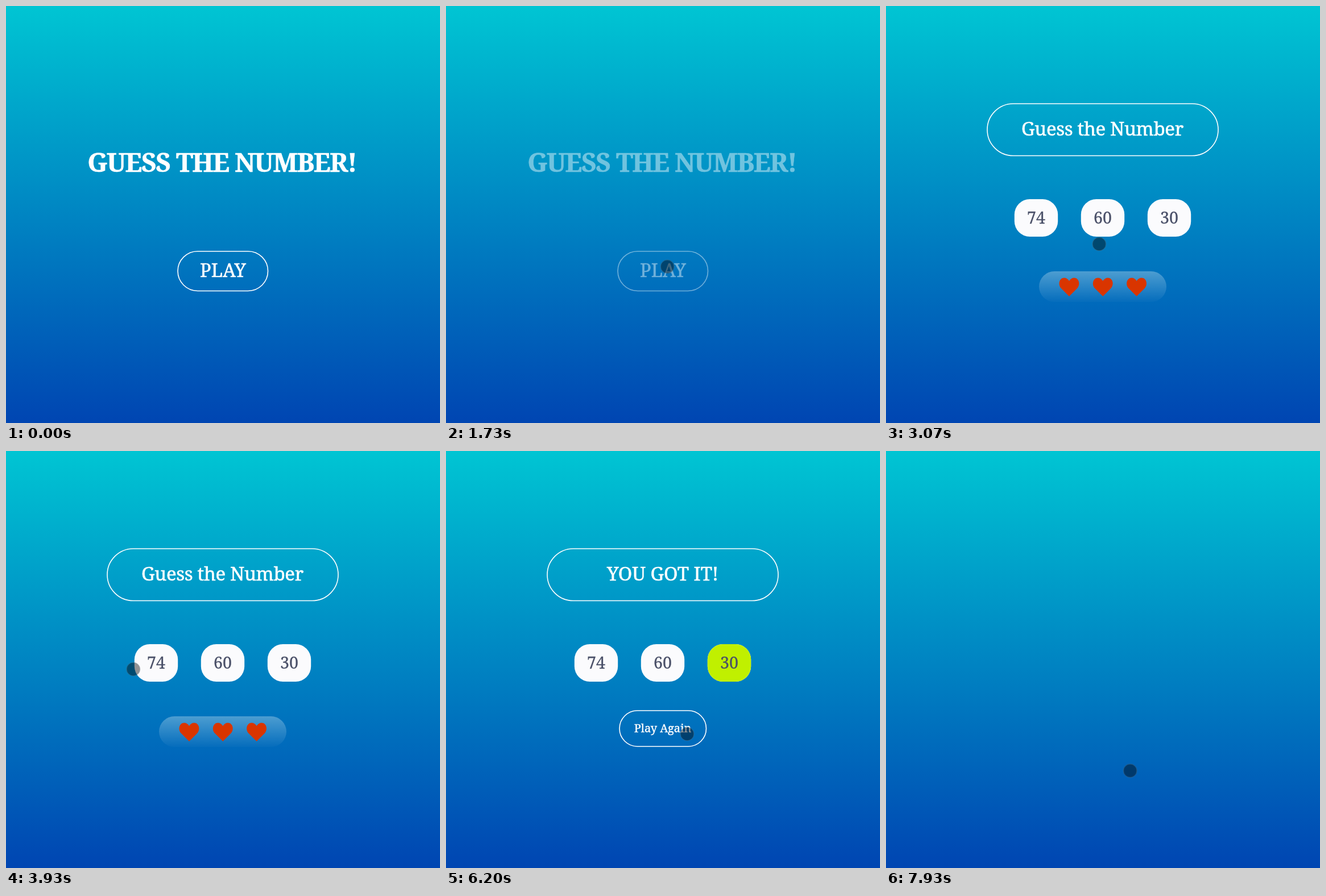
These frames come from a looping animation (763 by 734 pixels, 8000 ms). An HTML page:

```html
<!DOCTYPE html>
<html lang="en">
<head>
<meta charset="utf-8">
<title>Guess the Number</title>
<style>
  html, body { margin: 0; width: 100%; height: 100%; overflow: hidden; background: #0046b2; }
  svg { display: block; width: 100%; height: 100%; }
  text { font-family: "Noto Serif", "DejaVu Serif", serif; text-anchor: middle; fill: #fff; stroke: #fff; stroke-width: .6; }
  .outline { fill: none; stroke: #fff; stroke-width: 1.6; }
  .title { font-size: 46px; font-weight: 700; letter-spacing: -.036em; }
  .play { font-size: 32.5px; }
  .heading { font-size: 33px; }
  .again { font-size: 20px; stroke-width: .4; }
  .tile { fill: #fbfbfd; }
  .won { fill: #c0f000; }
  .number { font-size: 28.5px; fill: #4a5068; stroke: #4a5068; stroke-width: .3; }
  .heart { fill: #d93500; }
  #cursor { fill: rgba(0, 0, 0, .42); stroke: rgba(110, 130, 140, .4); }
</style>
</head>
<body>
<svg viewBox="0 0 763 734" preserveAspectRatio="none">
  <defs>
    <linearGradient id="sky" x2="0" y2="1">
      <stop stop-color="#00c5d3"/>
      <stop offset="1" stop-color="#0045b2"/>
    </linearGradient>
    <linearGradient id="glass" x2="0" y2="1">
      <stop stop-color="#fff" stop-opacity=".3"/>
      <stop offset="1" stop-color="#fff" stop-opacity=".02"/>
    </linearGradient>
    <path id="heart" d="M0 16.5L-14 2.5C-20.5-4.5-17-16-9-16C-5-16-2-14 0-10.5C2-14 5-16 9-16C17-16 20.5-4.5 14 2.5Z"/>
  </defs>
  <rect width="763" height="734" fill="url(#sky)"/>

  <g id="intro">
    <text class="title" x="379.5" y="292">GUESS THE NUMBER!</text>
    <rect class="outline" x="302" y="431.7" width="158.5" height="69.8" rx="35"/>
    <text class="play" x="381.5" y="477">PLAY</text>
  </g>

  <g id="game">
    <rect class="outline" x="178" y="172" width="406" height="91.5" rx="45.7"/>
    <text id="prompt" class="heading" x="380.5" y="228" letter-spacing="-.01em">Guess the Number</text>
    <text id="success" class="heading" x="381" y="228">YOU GOT IT!</text>
    <g id="tiles"></g>
    <g id="lives">
      <rect x="269" y="467" width="224" height="54" rx="27" fill="url(#glass)"/>
    </g>
    <g id="again">
      <rect class="outline" x="305" y="457" width="152.5" height="63" rx="31.5"/>
      <text class="again" x="381" y="495">Play Again</text>
    </g>
  </g>

  <circle id="cursor" r="11.8"/>
</svg>
<script>
const LOOP = 8000, FADE = 540;
const START = 1430, PICK = 4330, REPLAY = 6900;
const byId = id => document.getElementById(id);
const animate = (id, frames) => byId(id).animate(frames, { duration: LOOP, iterations: Infinity });

const tile = (x, attrs) => `<rect ${attrs} x="${x - 38.2}" y="340" width="76.4" height="66" rx="27"/>`;
[74, 60, 30].forEach((number, i) => {
  const x = 264 + 117 * i;
  byId('tiles').innerHTML += tile(x, 'class="tile"') + (number === 30 ? tile(x, 'class="won" id="won"') : '') +
    `<text class="number" x="${x}" y="383">${number}</text>`;
  byId('lives').innerHTML += `<use class="heart" href="#heart" x="${322 + 59.3 * i}" y="494.5"/>`;
});

// Flips the visibility at each given time
function toggle(id, visible, duration, ...times) {
  const frames = [{ offset: 0, opacity: visible }];
  for (const time of times) {
    frames.push({ offset: time / LOOP, opacity: visible });
    visible = 1 - visible;
    frames.push({ offset: (time + duration) / LOOP, opacity: visible });
  }
  animate(id, [...frames, { offset: 1, opacity: visible }]);
}

toggle('intro', 1, FADE, START);
toggle('game', 0, FADE, START + 1000, REPLAY);
toggle('lives', 1, FADE, PICK + 70);
toggle('again', 0, FADE, PICK + 70 + FADE);
toggle('prompt', 1, 0, PICK);
toggle('success', 0, 0, PICK);
toggle('won', 0, 0, PICK);
toggle('cursor', 0, 0, 70);

// Where the pointer turns or rests: time, x, y
const stops = [
  [0, 481, 18], [70, 481, 18], [640, 467, 315], [1070, 384, 459], [1650, 384, 459],
  [2400, 529, 446], [3070, 375, 419], [3870, 206, 384], [4300, 494, 386],
  [4670, 458, 468], [5100, 432, 505], [6200, 424, 498], [6750, 424, 498],
  [7430, 434, 578], [LOOP, 429, 562]
];

// Smooth curve through the stops that never overshoots them
const slope = (i, axis) => (stops[i + 1][axis] - stops[i][axis]) / (stops[i + 1][0] - stops[i][0]);
function tangent(i, axis) {
  if (i === 0 || i === stops.length - 1) return 0;
  const a = slope(i - 1, axis), b = slope(i, axis);
  return a * b > 0 ? 2 * a * b / (a + b) : 0;
}
function position(time, axis) {
  const i = Math.max(0, stops.findIndex(stop => stop[0] >= time) - 1);
  const [from, to] = [stops[i], stops[i + 1]];
  const span = to[0] - from[0], u = (time - from[0]) / span, v = 1 - u;
  return from[axis] * v * v * (1 + 2 * u) + to[axis] * u * u * (3 - 2 * u) +
    span * u * v * (v * tangent(i, axis) - u * tangent(i + 1, axis));
}

const samples = 160;
animate('cursor', Array.from({ length: samples + 1 }, (_, k) => {
  const time = LOOP * k / samples;
  return { offset: k / samples, transform: `translate(${position(time, 1)}px, ${position(time, 2)}px)` };
}));
</script>
</body>
</html>
```
